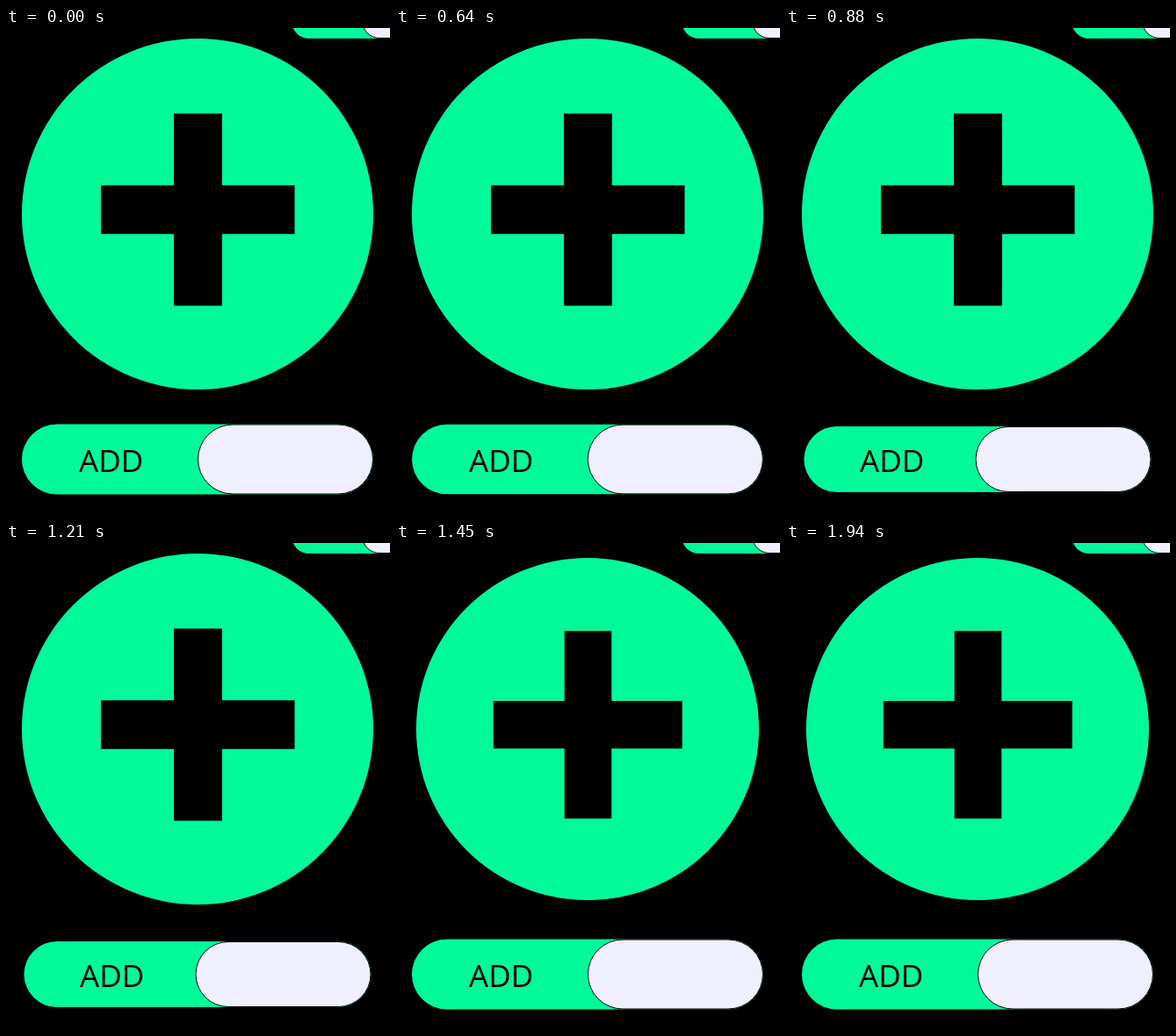
An HTML page that plays this animation: 437 px wide and 555 px high, repeating every 2 s.

```html
<!DOCTYPE html>
<html lang="en">
<head>
<meta charset="utf-8">
<title>Add buttons</title>
<style>
  html, body {
    margin: 0;
    width: 100%;
    height: 100%;
    overflow: hidden;
    background: #000;
  }
  svg { display: block; }

  .green { fill: #00fa9a; }
  .knob { fill: #f0efff; stroke: #000; stroke-width: 1; }
  text { font: 400 35px "Open Sans", "Noto Sans", sans-serif; }

  .round, .pill, .slider, .label { animation: 2s linear infinite; }
  .round { transform-origin: 218px 212px; animation-name: press-round; }
  .pill { animation-name: press-pill; }
  .slider { animation-name: press-slider; }
  .label { animation-name: press-label; }

  /* Presses ease in over 200 ms, releases are instant. */
  @keyframes press-round {
    0%, 62.5% { transform: scale(1); }
    72.5%, 100% { transform: scale(.975); }
  }
  @keyframes press-pill {
    0%, 31.5%, 62.501%, 100% { x: 18px; y: 451.5px; width: 400px; height: 80px; rx: 40px; }
    41.5%, 62.5% { x: 20.5px; y: 454px; width: 395px; height: 75px; rx: 37.5px; }
  }
  @keyframes press-slider {
    0%, 31.5%, 62.501%, 100% { x: 218.5px; y: 452px; height: 79px; rx: 39.5px; }
    41.5%, 62.5% { x: 216px; y: 454.5px; height: 74px; rx: 37px; }
  }
  @keyframes press-label {
    0%, 31.5%, 62.501%, 100% { transform: translateX(0); }
    41.5%, 62.5% { transform: translateX(1px); }
  }
</style>
</head>
<body>
<svg width="437" height="555" viewBox="0 0 437 555">
  <rect class="green" x="325" y="-28" width="160" height="40" rx="20"/>
  <rect class="knob" x="405.5" y="-27.5" width="79" height="39" rx="19.5"/>

  <g class="round">
    <circle class="green" cx="218" cy="212" r="200"/>
    <path d="M191 97.5h55v219h-55zM108 179.3h220.5v55.5h-220.5z"/>
  </g>

  <rect class="green pill" x="18" y="451.5" width="400" height="80" rx="40"/>
  <rect class="knob slider" x="218.5" y="452" width="199" height="79" rx="39.5"/>
  <text class="label" x="83" y="505.5">ADD</text>
</svg>
</body>
</html>
```
